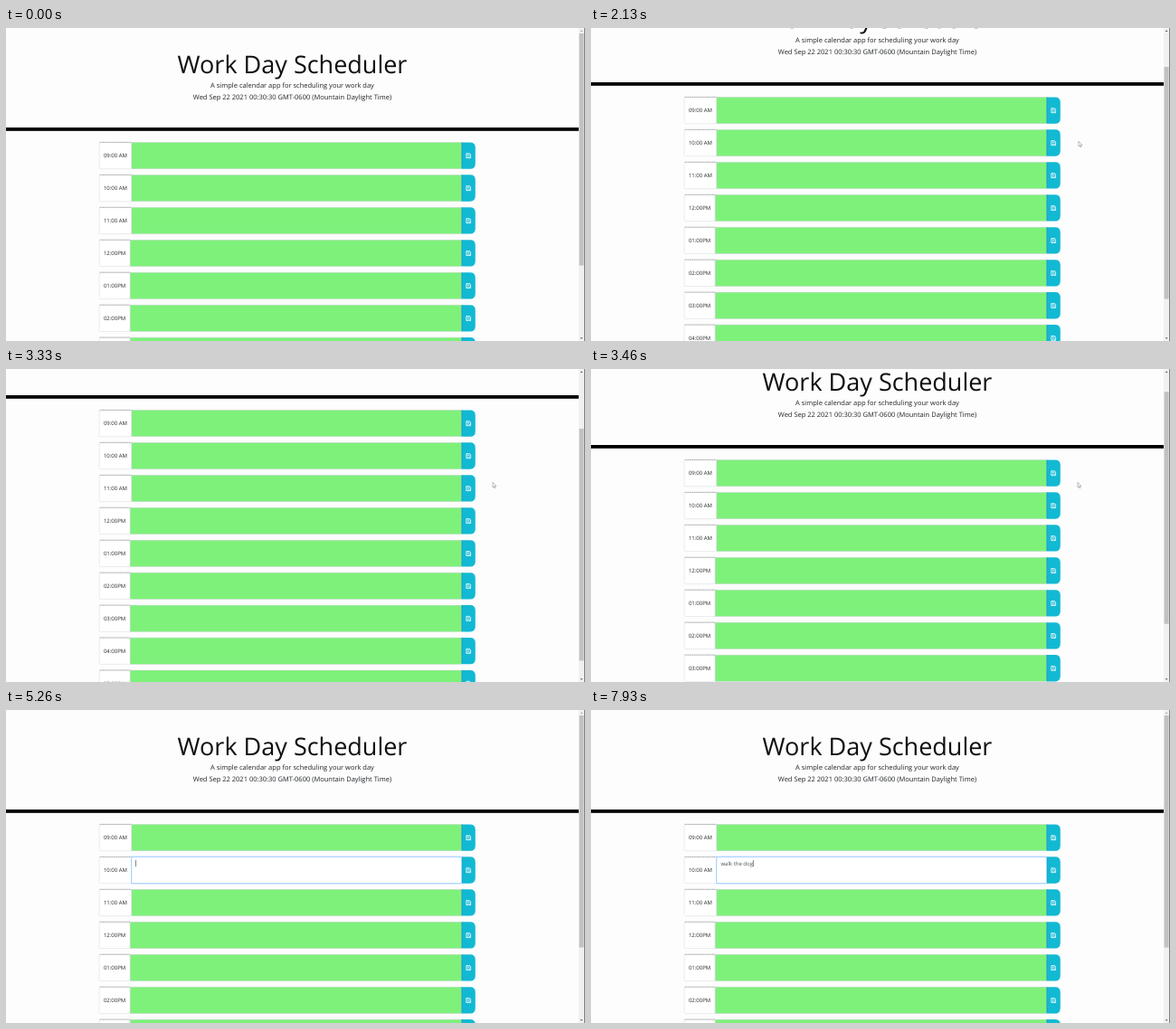
These frames come from a looping animation (640 px wide and 346 px high, 8 s). An HTML page:

```html
<!DOCTYPE html>
<html lang="en">
<head>
<meta charset="utf-8">
<title>Work Day Scheduler</title>
<style>
  html, body { margin: 0; width: 100%; height: 100%; overflow: hidden; background: #fdfdfd; }
  svg { display: block; width: 100%; height: 100%; }
  text { font-family: "Open Sans", sans-serif; fill: #212529; text-rendering: geometricPrecision; white-space: pre; }
  .title { font-size: 27px; fill: #0d0f11; }
  .lead { font-size: 7.5px; }
  .label, #typed { font-size: 6px; }
  #typed { fill: #495057; }
  .middle { text-anchor: middle; }
</style>
</head>
<body>
<svg viewBox="0 0 640 346">
  <defs>
    <g id="save">
      <path d="M503.6 .2H513Q518.8.2 518.8 6V23.7Q518.8 29.5 513 29.5H503.6Z" fill="#12b9d3"/>
      <path d="M503.8 .4V29.3" stroke="#08677a" stroke-width=".6" stroke-dasharray="1.1 .6"/>
      <g fill="none" stroke="#fff" stroke-width=".75">
        <path d="M508.8 12.5H512.4L513.6 13.7V17.5H508.8Z"/>
        <path d="M509.9 12.6V14.3H512.2V12.6M509.9 17.4V15.9H512.5V17.4" stroke-width=".6"/>
      </g>
    </g>
  </defs>
  <rect width="640" height="346" fill="#fdfdfd"/>
  <g id="page">
    <text class="title middle" x="316.5" y="50.3">Work Day Scheduler</text>
    <text class="lead middle" x="316.5" y="65.5">A simple calendar app for scheduling your work day</text>
    <text class="lead middle" x="316.5" y="79">Wed Sep 22 2021 00:30:30 GMT-0600 (Mountain Daylight Time)</text>
    <rect y="110" width="633" height="3.8"/>
    <g id="rows"></g>
    <g id="field">
      <rect x="138" y="161.6" width="366" height="30.8" rx=".8" fill="#bfdeff"/>
      <rect x="138.9" y="162.5" width="364.4" height="29" fill="#fff" stroke="#80bdff" stroke-width=".5"/>
      <text id="typed" x="143.4" y="171.5"></text>
      <rect id="caret" y="165.8" width=".6" height="7.4" fill="#343a40"/>
    </g>
  </g>
  <rect x="633" width="7" height="346" fill="#f1f1f1"/>
  <rect id="thumb" x="633.6" y="6" width="5" height="256.5" fill="#c1c1c1"/>
  <path id="up" d="M634.6 4L636.1 2.4L637.6 4Z"/>
  <path id="down" d="M634.6 342.2L636.1 343.8L637.6 342.2Z"/>
  <rect x="639.2" width=".8" height="346" fill="#666"/>
  <g id="pointer">
    <path id="arrow" d="M0 0V5.6L1.3 4.5L2.2 6.4L3 6L2.2 4.2H3.9Z" fill="#fff" stroke="#777" stroke-width=".5"/>
    <path id="beam" d="M-1 -3H1M0 -3V3M-1 3H1" fill="none" stroke="#333" stroke-width=".5"/>
  </g>
</svg>
<script>
const $ = id => document.getElementById(id);
const FRAME = 200 / 3, LOOP = 8000, MAX_SCROLL = 105, PITCH = 35.95;
const MESSAGE = "walk the dog";
const KEY_TIMES = [5530, 5660, 5800, 5860, 6000, 6060, 6200, 6260, 6400, 6460, 6600, 6730];
const FOCUS_TIME = 5130, HIDE_TIME = 5255, BLINK = 530;
const SCROLL_DOWN = [0, 4, 15, 31, 50, 70, 88, 100, MAX_SCROLL];
const SCROLL_UP = [102, 94, 81, 54, 26, 7, 0];

const hours = ["09:00 AM", "10:00 AM", "11:00 AM", "12:00PM", "01:00PM", "02:00PM", "03:00PM", "04:00PM", "05:00PM"];
$("rows").innerHTML = hours.map((hour, i) => {
  const left = hour.endsWith(" AM") ? 138.9 : 137.2;
  return `<g transform="translate(0 ${126.2 + i * PITCH})">
    <rect x="103.2" y=".2" width="${left - 103.2}" height="29.3" rx="1.2" fill="#fff" stroke="#d5d9dd" stroke-width=".5"/>
    <path d="M103.6 .2H${left}" stroke="#555" stroke-width=".5" stroke-dasharray="1.1 .6"/>
    <text class="label" x="107.9" y="17">${hour}</text>
    <rect x="${left}" y=".2" width="${503.4 - left}" height="29.3" fill="#7ef17a" stroke="#ced4da" stroke-width=".5"/>
    <use href="#save"/>
  </g>`;
}).join("");

const show = (id, on) => $(id).setAttribute("visibility", on ? "visible" : "hidden");
const clamp = (v, lo, hi) => Math.min(hi, Math.max(lo, v));
const stepAt = (t, start) => Math.floor((t - start + 7) / FRAME);

function scrollAt(t) {
  if (t < 1860) return 0;
  if (t < 3195) return SCROLL_DOWN[clamp(stepAt(t, 1866), 0, SCROLL_DOWN.length - 1)];
  return SCROLL_UP[clamp(stepAt(t, 3200), 0, SCROLL_UP.length - 1)];
}

function drawPointer(t) {
  const p = clamp((stepAt(t, 4400) + 1) / 11, 0, 1);
  const ease = p * p * (3 - 2 * p);
  const startX = t < 3195 ? 539 : 538;
  const x = startX + (330 - startX) * ease;
  const y = 125.3 + 52 * Math.sin(ease * Math.PI / 2);
  const visible = t >= 1860 && t < HIDE_TIME;
  const overField = x < 503;
  $("pointer").setAttribute("transform", `translate(${x} ${y})`);
  show("arrow", visible && !overField);
  show("beam", visible && overField);
}

function drawField(t) {
  const focused = t >= FOCUS_TIME;
  $("field").setAttribute("display", focused ? "inline" : "none");
  if (!focused) return;
  const count = KEY_TIMES.filter(k => k <= t).length;
  const lastInput = count ? KEY_TIMES[count - 1] : FOCUS_TIME;
  $("typed").textContent = MESSAGE.slice(0, count);
  const width = count ? $("typed").getComputedTextLength() : 0;
  $("caret").setAttribute("x", 143.4 + width);
  $("caret").setAttribute("opacity", Math.floor((t - lastInput) / BLINK) % 2 ? 0 : 1);
}

function draw(t) {
  const scroll = scrollAt(t);
  $("page").setAttribute("transform", `translate(0 ${-scroll})`);
  $("thumb").setAttribute("y", 6 + scroll * 0.74);
  $("up").setAttribute("fill", scroll > 0 ? "#505050" : "#a3a3a3");
  $("down").setAttribute("fill", scroll < MAX_SCROLL ? "#505050" : "#a3a3a3");
  drawField(t);
  drawPointer(t);
}

const start = performance.now();
function tick() {
  draw((performance.now() - start) % LOOP);
  requestAnimationFrame(tick);
}
tick();
</script>
</body>
</html>
```
